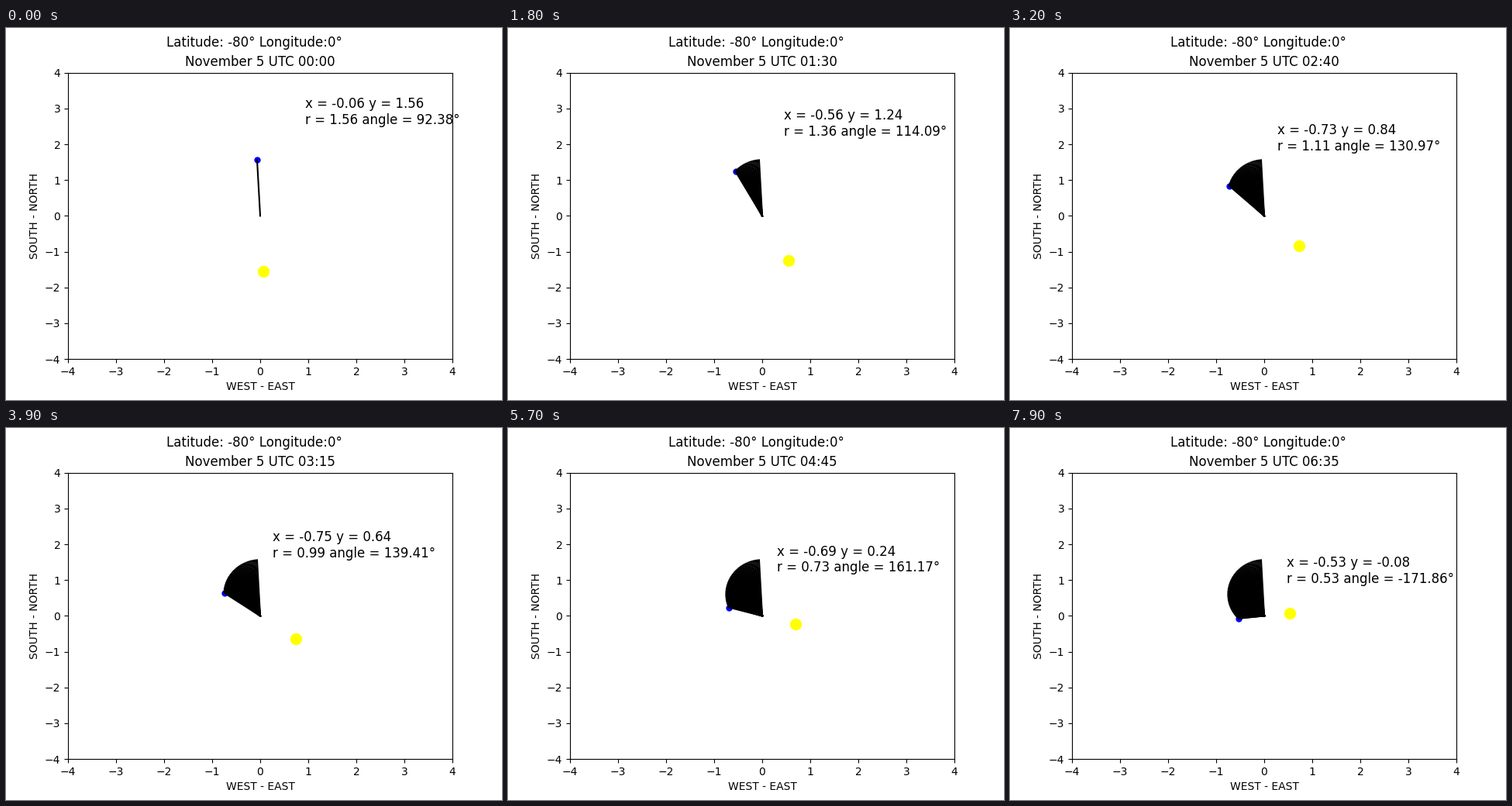
A matplotlib script for the animation above (8000 ms loop, 640x480 px).

```python
import numpy as np
import matplotlib.pyplot as plt
from matplotlib.animation import FuncAnimation

FRAMES = 80
STEP_MIN = 5
LAT = np.radians(80)


def shadow(minute):
    """Tip of the shadow, minutes after midnight UTC."""
    dec = np.radians(16.345 + 0.29 * minute / 1440)
    hour = np.radians(2.465 + minute / 4)
    east = np.cos(dec) * np.sin(hour)
    south = np.sin(LAT) * np.cos(dec) * np.cos(hour) + np.cos(LAT) * np.sin(dec)
    up = np.sin(LAT) * np.sin(dec) - np.cos(LAT) * np.cos(dec) * np.cos(hour)
    scale = np.cos(LAT) / up
    return -east * scale, south * scale


tips = [shadow(STEP_MIN * i) for i in range(FRAMES)]

fig, ax = plt.subplots(figsize=(6.4, 4.8), dpi=100)
fig.suptitle("Latitude: -80° Longitude:0°")
title = ax.set_title("")
ax.set_xlim(-4, 4)
ax.set_ylim(-4, 4)
ax.set_xlabel("WEST - EAST")
ax.set_ylabel("SOUTH - NORTH")

dot, = ax.plot([], [], "bo", markersize=5, zorder=1)
sun, = ax.plot([], [], "o", color="yellow", markersize=10)
rays = [ax.plot([0, x], [0, y], "k", lw=1.5)[0] for x, y in tips]
label = ax.text(0, 0, "", fontsize=12)


def update(i):
    x, y = tips[i]
    for k, ray in enumerate(rays):
        ray.set_visible(k <= i)
    dot.set_data([x], [y])
    sun.set_data([-x], [-y])

    hours, minutes = divmod(STEP_MIN * i, 60)
    title.set_text(f"November 5 UTC {hours:02d}:{minutes:02d}")

    r = np.hypot(x, y)
    angle = np.degrees(np.arctan2(y, x))
    vals = [round(float(v), 2) for v in (x, y, r, angle)]
    label.set_position((x + 1, y + 1))
    label.set_text("x = {} y = {}\nr = {} angle = {}°".format(*vals))
    return [*rays, dot, sun, title, label]


anim = FuncAnimation(fig, update, frames=FRAMES, interval=100, repeat=True)
plt.show()
```
